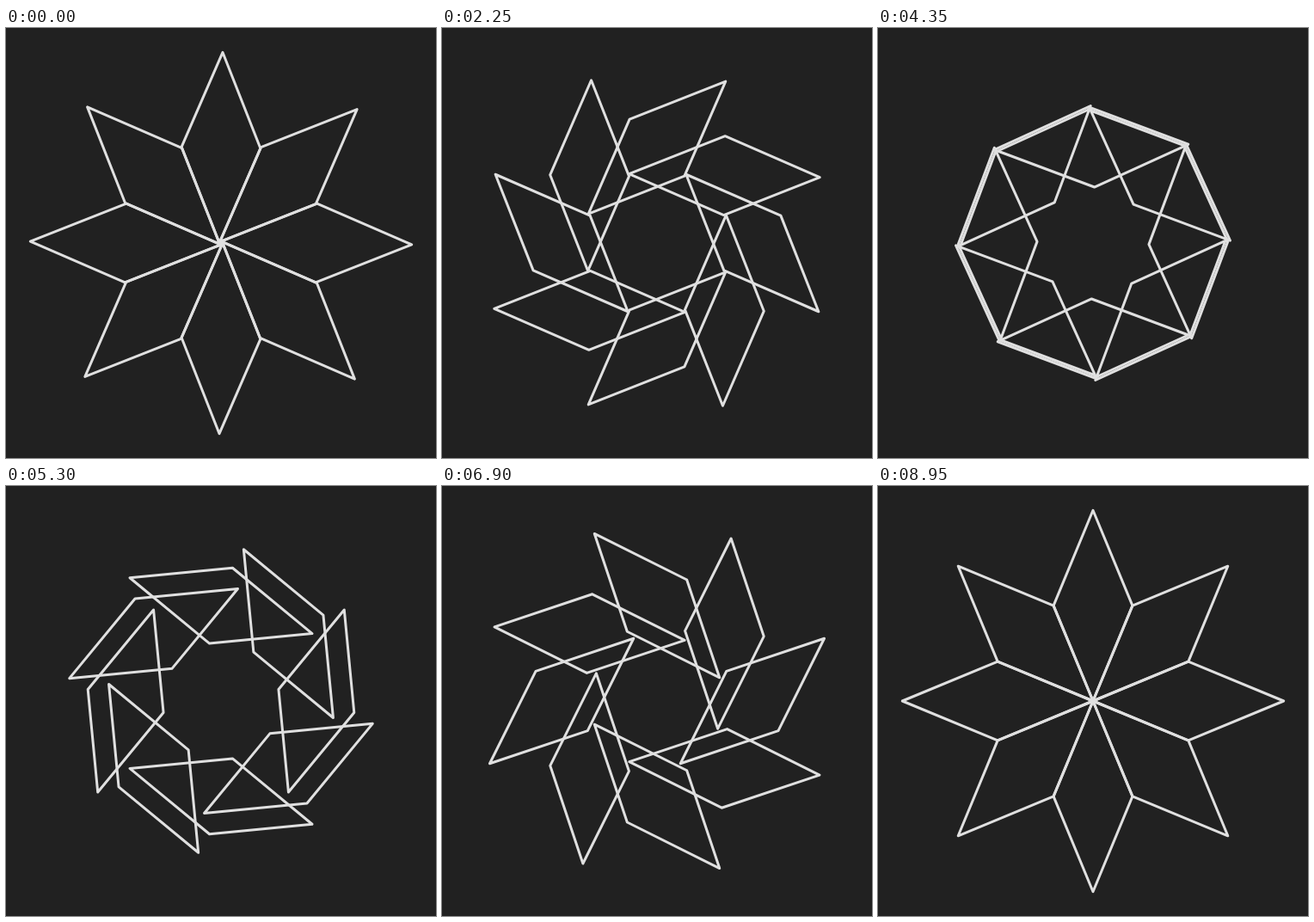
These frames come from a looping animation (500x500 px, 9000 ms). An HTML page with a canvas:

```html
<!DOCTYPE html>
<html lang="en">
<head>
<meta charset="utf-8">
<title>Rotating rhombi</title>
<style>
  html, body { margin: 0; height: 100%; overflow: hidden; background: #212121; }
  canvas { display: block; }
</style>
</head>
<body>
<canvas id="stage" width="500" height="500"></canvas>
<script>
const ctx = document.getElementById("stage").getContext("2d");
const COUNT = 8;
const SIDE = 120;
const STEP_MS = 50;
const STEPS = 180;
const RAD = Math.PI / 180;
const LONG = SIDE * Math.cos(22.5 * RAD);
const SHORT = SIDE * Math.sin(22.5 * RAD);

function rhombus() {
  ctx.beginPath();
  ctx.moveTo(0, -LONG);
  ctx.lineTo(SHORT, 0);
  ctx.lineTo(0, LONG);
  ctx.lineTo(-SHORT, 0);
  ctx.closePath();
  ctx.stroke();
}

function draw(time) {
  // One degree per step; half a turn brings each rhombus back onto itself.
  const degrees = Math.floor(time / STEP_MS) % STEPS + 1;
  ctx.fillStyle = "#212121";
  ctx.fillRect(0, 0, 500, 500);
  ctx.strokeStyle = "#e0e0e0";
  ctx.lineWidth = 3;
  ctx.lineJoin = "round";
  for (let i = 0; i < COUNT; i++) {
    ctx.save();
    ctx.translate(250, 250);
    ctx.rotate(i * 2 * Math.PI / COUNT);
    ctx.translate(0, -LONG);
    ctx.rotate(degrees * RAD);
    rhombus();
    ctx.restore();
  }
}

function tick(now) {
  draw(now);
  requestAnimationFrame(tick);
}

draw(0);
requestAnimationFrame(tick);
</script>
</body>
</html>
```
